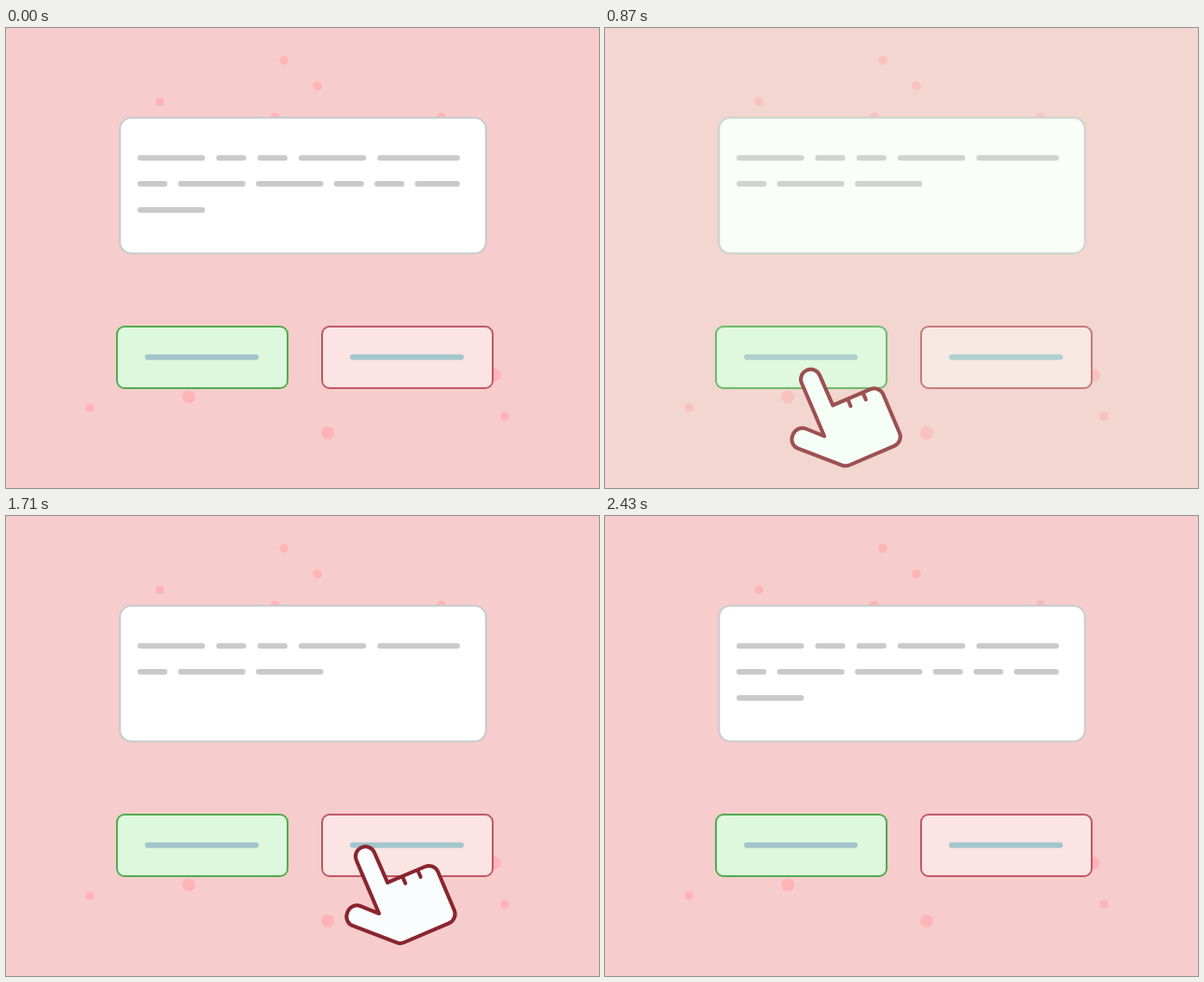
These frames come from a looping animation (636 by 493 pixels, 3600 ms). An HTML page with a canvas:

```html
<!DOCTYPE html>
<html lang="en">
<head>
<meta charset="utf-8">
<title>Choose a card</title>
<style>
  html, body { margin: 0; width: 100%; height: 100%; overflow: hidden; background: #f6cdcc; }
  canvas { display: block; }
</style>
</head>
<body>
<canvas id="stage" width="636" height="493"></canvas>
<script>
const canvas = document.getElementById('stage');
const ctx = canvas.getContext('2d');
const LOOP = 3600, STEP = 30;

const SMALL_DOTS = [[298, 34.5], [334, 62], [165, 79], [288.5, 95.5], [467, 95.5], [90, 407], [535, 416]];
const BIG_DOTS = [[196, 395.5], [345, 434], [524, 372]];

// Letters per word, line by line
const SHORT_TEXT = [[9, 4, 4, 9, 11], [4, 9, 9]];
const FULL_TEXT = [[9, 4, 4, 9, 11], [4, 9, 9, 4, 4, 6], [9]];

const FIRST = { start: 637, side: -1, x: 211.5, text: FULL_TEXT, flash: '222,248,221' };
const SECOND = { start: 1927, side: 1, x: 430.5, text: SHORT_TEXT, flash: '251,228,227' };
const THROW_TIME = 233;

const clamp = v => Math.max(0, Math.min(1, v));
const progress = (t, start, end) => clamp((t - start) / (end - start));
const easeOut = p => p * (2 - p);
const easeInOut = p => p < 0.5 ? 2 * p * p : 1 - 2 * (1 - p) ** 2;
const lerp = (a, b, p) => a + (b - a) * p;
const mix = (a, b, p) => `rgb(${a.map((v, i) => lerp(v, b[i], p)).join()})`;

// Upright hand around the centre of its fingertip
const HAND = (() => {
  const corners = [
    [-10.5, -10.5], [10.5, -10.5], [11, 35, 0], [65.3, 35], [65.3, 100.8],
    [-2, 101], [-49.2, 55.5], [-32.7, 39.6], [-10.3, 62, 0]
  ];
  const path = new Path2D();
  path.moveTo(-10.4, 30);
  corners.forEach(([x, y, radius = 10.5], i) => {
    const [nextX, nextY] = corners[(i + 1) % corners.length];
    path.arcTo(x, y, nextX, nextY, radius);
  });
  path.closePath();
  for (const x of [28.3, 46]) {
    path.moveTo(x, 35);
    path.lineTo(x, 43.3);
  }
  return path;
})();

function dots(list, radius) {
  ctx.fillStyle = '#ffb4b7';
  for (const [x, y] of list) {
    ctx.beginPath();
    ctx.arc(x, y, radius, 0, 2 * Math.PI);
    ctx.fill();
  }
}

function box(x, y, w, h, radius, fill, stroke) {
  ctx.beginPath();
  ctx.roundRect(x, y, w, h, radius);
  ctx.fillStyle = fill;
  ctx.fill();
  ctx.lineWidth = 2;
  ctx.strokeStyle = stroke;
  ctx.stroke();
}

function bar(x, y, width, color) {
  ctx.beginPath();
  ctx.roundRect(x, y - 3, width, 6, 3);
  ctx.fillStyle = color;
  ctx.fill();
}

function button(x, fill, stroke) {
  box(x, 320, 183, 66, 8, fill, stroke);
  bar(x + 30, 352.8, 122, '#a2c5cc');
}

function card(text) {
  box(122.3, 96.3, 392.4, 145.2, 12, '#fff', '#cacccd');
  text.forEach((words, row) => {
    let x = 141;
    for (const letters of words) {
      const width = letters * 8.05;
      bar(x, 139.2 + 27.9 * row, width, '#cacaca');
      x += width + 12 - 0.8 * row;
    }
  });
}

function thrownCard({ start, side, text }, t) {
  const s = Math.max(0, t - start);
  if (s >= THROW_TIME) return;
  const shift = 0.003955 * s * s;
  const degrees = shift * (0.0325 + 0.00017 * shift);
  ctx.save();
  ctx.globalAlpha = clamp((THROW_TIME - s) / 133);
  ctx.translate(318.5 + side * shift, 169 + 0.027 * s);
  ctx.rotate(side * degrees * Math.PI / 180);
  ctx.translate(-318.5, -169);
  card(text);
  ctx.restore();
}

function rays({ start, x }, t) {
  const s = t - start;
  const outer = lerp(51.5, 73.5, progress(s, 30, 90));
  const inner = lerp(51.5, 73.5, progress(s, 102, 172));
  if (inner >= outer) return;
  ctx.strokeStyle = '#669bcb';
  ctx.lineWidth = 4;
  ctx.beginPath();
  for (let i = -2; i <= 2; i++) {
    const sin = Math.sin(i * Math.PI / 8), cos = Math.cos(i * Math.PI / 8);
    ctx.moveTo(x + outer * sin, 348 - outer * cos);
    ctx.lineTo(x + inner * sin, 348 - inner * cos);
  }
  ctx.stroke();
}

function hand(t) {
  const across = easeInOut(progress(t, 1470, 1830));
  const retreat = 2 * (1 - easeOut(progress(t, 300, 585)))
    + easeInOut(progress(t, 630, 1080)) - across
    + easeInOut(progress(t, 2100, 2430));
  const tint = progress(t, 300, 570);
  ctx.save();
  ctx.globalAlpha = progress(t, 300, 400) * (1 - progress(t, 2130, 2430));
  ctx.translate(lerp(FIRST.x, SECOND.x, across) + 16 * retreat, 357.5 + 33.5 * retreat);
  ctx.rotate(-23 * Math.PI / 180);
  ctx.fillStyle = mix([222, 241, 247], [250, 253, 254], tint);
  ctx.fill(HAND);
  ctx.lineWidth = 4;
  ctx.strokeStyle = mix([205, 192, 188], [138, 37, 46], tint);
  ctx.stroke(HAND);
  ctx.restore();
}

function flash({ start, flash }, t) {
  const s = t - start;
  const alpha = 0.7 * progress(s, 23, 83) * (1 - progress(s, 83, 293));
  ctx.fillStyle = `rgba(${flash},${alpha})`;
  ctx.fillRect(0, 0, canvas.width, canvas.height);
}

function draw(t) {
  ctx.fillStyle = '#f6cdcc';
  ctx.fillRect(0, 0, canvas.width, canvas.height);
  dots(SMALL_DOTS, 4.8);
  dots(BIG_DOTS, 7);
  button(119, '#def8dd', '#55ab53');
  button(339, '#fbe4e3', '#c25a68');

  const current = t < FIRST.start + THROW_TIME ? FIRST : SECOND;
  card(current === FIRST ? SHORT_TEXT : FULL_TEXT);
  thrownCard(current, t);
  rays(current, t);
  hand(t);
  flash(FIRST, t);
  flash(SECOND, t);
}

ctx.lineCap = ctx.lineJoin = 'round';
const began = performance.now();
function tick() {
  const t = (performance.now() - began) % LOOP;
  draw(Math.floor(t / STEP) * STEP);
  requestAnimationFrame(tick);
}
tick();
</script>
</body>
</html>
```
